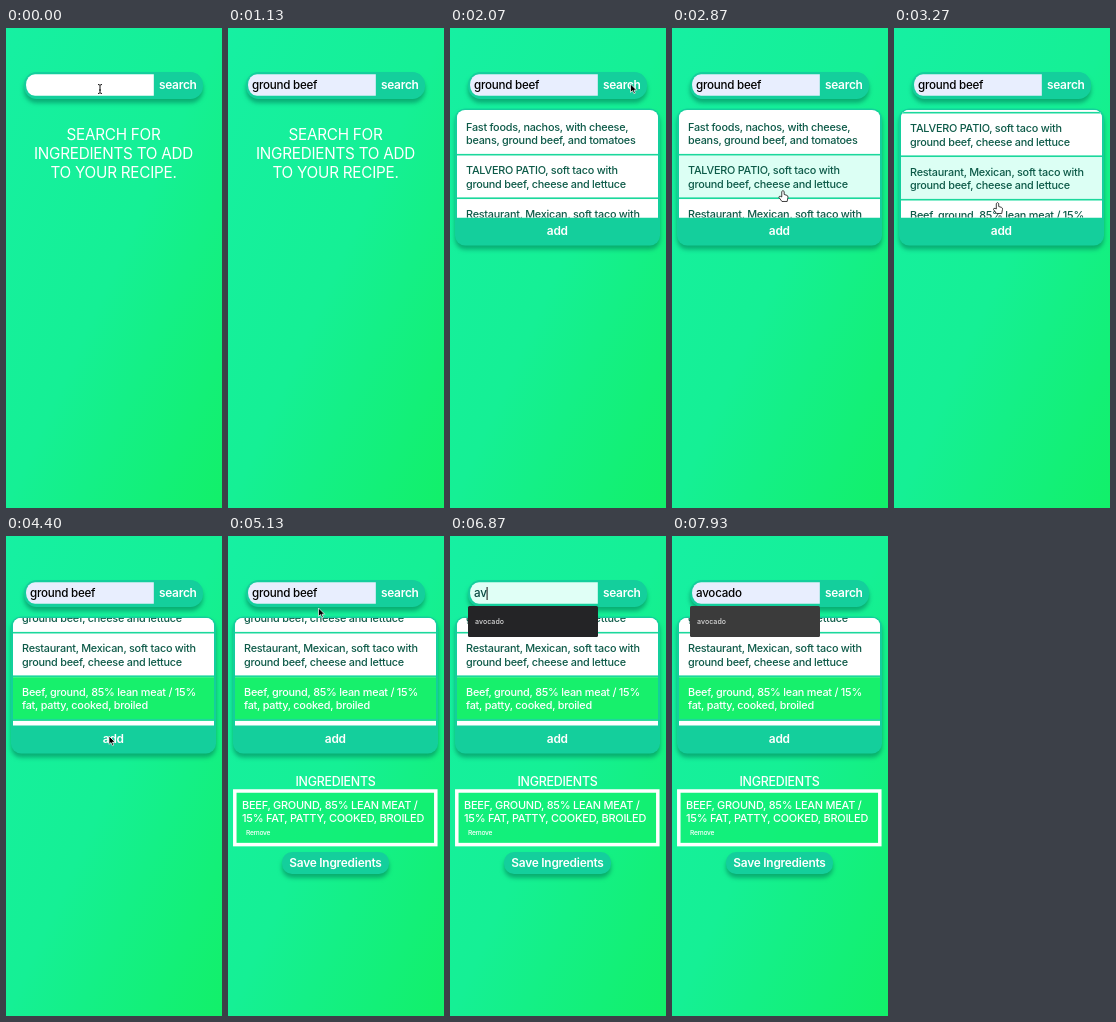
An HTML page for the animation above (8000 ms loop, 216 by 480 pixels).

```html
<!DOCTYPE html>
<html lang="en">
<head>
<meta charset="utf-8">
<title>Ingredient search</title>
<style>
  html, body { margin: 0; width: 100%; height: 100%; overflow: hidden; }
  #stage { display: block; width: 100vw; height: 100vh; font: 500 12px Inter, "Liberation Sans", sans-serif; letter-spacing: -.02em; }
  .raised { filter: drop-shadow(0 4px 2.3px rgba(0, 125, 90, .58)); }
  .teal { fill: #14cf9c; }
  .white { fill: #fff; }
  .mid { text-anchor: middle; }
  .button { font-weight: 600; font-size: 11.9px; }
  #prompt { font-size: 15.25px; font-weight: 400; }
  #list { font-size: 10.85px; }
  #menu { font-size: 7px; letter-spacing: .01em; fill: #ddd; }
</style>
</head>
<body>
<svg id="stage" viewBox="0 0 216 480" preserveAspectRatio="none">
  <defs>
    <linearGradient id="page" x1="0" y1="0" x2="1" y2="1">
      <stop offset="0" stop-color="#16f0a2"/>
      <stop offset=".5" stop-color="#15f095"/>
      <stop offset="1" stop-color="#12f069"/>
    </linearGradient>
    <clipPath id="listClip"><path d="M7 189.5V90a8 8 0 0 1 8-8H200a8 8 0 0 1 8 8V189.5Z"/></clipPath>
  </defs>
  <rect width="216" height="480" fill="url(#page)"/>

  <g id="prompt" class="white mid">
    <text x="107.5" y="111.5">SEARCH FOR</text>
    <text x="107.5" y="130.5">INGREDIENTS TO ADD</text>
    <text x="107.5" y="149.5">TO YOUR RECIPE.</text>
  </g>

  <g class="raised"><rect class="teal" x="18" y="44" width="179" height="27" rx="12.5"/></g>
  <path id="field" d="M147.8 46.2V67.8H29a9 10.8 0 0 1 0-21.6Z"/>
  <rect id="selection" x="24" y="50" height="15" fill="#a9cdfb"/>
  <text id="typed" x="24" y="61.4" font-size="11.6"></text>
  <rect id="caret" y="51" width="1" height="13" fill="#111"/>
  <text class="white mid button" x="171.8" y="61.4">search</text>

  <g id="results">
    <g class="raised"><rect class="teal" x="5" y="80.5" width="205" height="137" rx="10"/></g>
    <g clip-path="url(#listClip)">
      <rect class="white" x="7" y="82" width="201" height="108"/>
      <g id="list"></g>
    </g>
    <text class="white mid button" x="107.3" y="206.5">add</text>
  </g>

  <g id="recipe" class="white">
    <text class="mid" x="107.5" y="250" font-size="12.4">INGREDIENTS</text>
    <rect x="6.8" y="255" width="201" height="53.6" fill="#12f069" fill-opacity=".6" stroke="#fff" stroke-width="3.5"/>
    <g font-size="10.95">
      <text x="14" y="272.5">BEEF, GROUND, 85% LEAN MEAT /</text>
      <text x="14" y="286">15% FAT, PATTY, COOKED, BROILED</text>
    </g>
    <text x="18" y="298.7" font-size="6.7">Remove</text>
    <g class="raised"><rect class="teal" x="54" y="316" width="107" height="22" rx="10"/></g>
    <text class="mid button" x="107.5" y="331">Save Ingredients</text>
  </g>

  <g id="menu">
    <rect id="menuBox" x="18" y="70" width="130" rx="1.5"/>
    <text id="option1" x="25" y="88"></text>
    <text id="option2" x="25" y="104"></text>
  </g>

  <g id="pointer">
    <path id="arrow" d="M0 0V8.4L2 6.6L3.4 9.7L4.8 9.1L3.5 6.2H6.2Z" fill="#000" stroke="#fff" stroke-width=".7"/>
    <path id="beam" d="M-2-4.5Q0-4.5 0-3.5Q0-4.5 2-4.5M0-3.5V3.5M-2 4.5Q0 4.5 0 3.5Q0 4.5 2 4.5M-1 1H1" fill="none" stroke="#111"/>
    <path id="hand" d="M-1.2 1V-4.5Q0-6.3 1.2-4.5V-1.5L4-.6Q5.2-.2 5 1.4L4.2 5.5H-1L-4 1.5Q-4-.2-2.4.4Z" fill="#fff" stroke="#111" stroke-width=".8"/>
  </g>
</svg>
<script>
const LOOP = 8000, PITCH = 43.5, LIST_TOP = 83, MAX_SCROLL = 73.5;
const el = Object.fromEntries([...document.querySelectorAll('#stage [id]')].map(node => [node.id, node]));

const foods = [
  ['Fast foods, nachos, with cheese,', 'beans, ground beef, and tomatoes'],
  ['TALVERO PATIO, soft taco with', 'ground beef, cheese and lettuce'],
  ['Restaurant, Mexican, soft taco with', 'ground beef, cheese and lettuce'],
  ['Beef, ground, 85% lean meat / 15%', 'fat, patty, cooked, broiled']
];
el.list.innerHTML = foods.map(([first, second], i) => `
  <g transform="translate(7 ${LIST_TOP + i * PITCH})">
    <rect y="1.2" width="201" height="${PITCH}"/>
    <rect y="42.9" width="201" height="1.8" fill="#1bd89c"/>
    <text x="9" y="19.7">${first}</text><text x="9" y="33.2">${second}</text>
  </g>`).join('');
const rows = [...el.list.children];

// [time, text]
const typing = [[0, ''], [200, 'g'], [400, 'gr'], [870, 'ground beef'], [6130, ''], [6470, 'a'],
  [6870, 'av'], [7000, 'avo'], [7200, 'avoc'], [7930, 'avocado']];
// [time, x, y]
const mousePath = [[0, 94, 61], [1270, 94, 61], [1730, 180.5, 56], [2330, 180.5, 56], [3000, 103.5, 180],
  [3930, 103.5, 180], [4400, 103, 200], [4600, 103, 200], [5130, 90.5, 72], [5470, 88, 58], [8000, 88, 58]];
const scrollPath = [[0, 0], [3180, 0], [3270, 42], [3600, MAX_SCROLL], [8000, MAX_SCROLL]];

const within = (t, from, to) => t >= from && t < to;
const show = (node, on) => node.setAttribute('visibility', on ? 'visible' : 'hidden');
const set = (node, values) => Object.entries(values).forEach(([key, value]) => node.setAttribute(key, value));

function follow(path, t) {
  const i = path.findIndex(point => point[0] > t);
  const a = path[i - 1], b = path[i];
  const p = (t - a[0]) / (b[0] - a[0]), eased = p * p * (3 - 2 * p);
  return a.slice(1).map((v, k) => v + (b[k + 1] - v) * eased);
}

function drawField(t) {
  const text = typing.findLast(step => step[0] <= t)[1];
  const autofilled = within(t, 870, 6130) || t >= 7930;
  const focused = within(t, 70, 870) || within(t, 6130, 7930);
  const tint = Math.min(1, Math.max(0, (t - 70) / 200));
  const mint = `rgb(${255 - 31 * tint},255,${255 - 9 * tint})`;
  el.field.style.fill = autofilled ? '#e8eefe' : mint;
  el.typed.textContent = text;
  el.typed.style.fill = autofilled ? '#000' : '#0b4a42';
  const width = text ? el.typed.getComputedTextLength() : 0;
  set(el.caret, { x: 24 + width });
  show(el.caret, focused && t < 7670);
  set(el.selection, { width });
  show(el.selection, within(t, 5730, 6130));
}

function drawMenu(t) {
  const early = t < 2000, twoOptions = within(t, 6470, 6870);
  show(el.menu, within(t, 270, 1130) || t >= 6470);
  set(el.menuBox, { height: twoOptions ? 47 : 31, fill: within(t, 870, 1130) || t >= 7930 ? '#3b3b3b' : '#242426' });
  el.option1.textContent = early ? 'ground beef' : 'avocado';
  el.option2.textContent = twoOptions ? 'apple' : '';
}

function drawList(t, mouseY) {
  const [scroll] = follow(scrollPath, t);
  set(el.list, { transform: `translate(0 ${-scroll})` });
  // Hover stays on the same row until scrolling settles.
  const hoverScroll = within(t, 3180, 3600) ? 0 : scroll;
  const hovered = within(mouseY, LIST_TOP, 189) ? Math.floor((mouseY - LIST_TOP + hoverScroll) / PITCH) : -1;
  rows.forEach((row, i) => {
    const chosen = i === 3 && t >= 3930;
    row.firstElementChild.style.fill = chosen ? '#17f06c' : i === hovered && t >= 2330 ? '#dcfff4' : '#fff';
    row.style.fill = chosen ? '#fff' : '#0d5a48';
  });
}

function drawPointer(t, x, y) {
  const overField = within(y, 47, 67) && x < 147;
  const overList = t >= 2070 && within(y, LIST_TOP, 189);
  set(el.pointer, { transform: `translate(${x} ${y})` });
  const visible = t < 200 || within(t, 1270, 6130);
  show(el.beam, visible && overField);
  show(el.hand, visible && overList);
  show(el.arrow, visible && !overField && !overList);
}

function render(now) {
  const t = now % LOOP, [x, y] = follow(mousePath, t);
  show(el.prompt, t < 2070);
  show(el.results, t >= 2070);
  show(el.recipe, t >= 4670);
  drawField(t);
  drawMenu(t);
  drawList(t, y);
  drawPointer(t, x, y);
}

const start = performance.now();
function tick() {
  render(performance.now() - start);
  requestAnimationFrame(tick);
}
tick();
</script>
</body>
</html>
```
